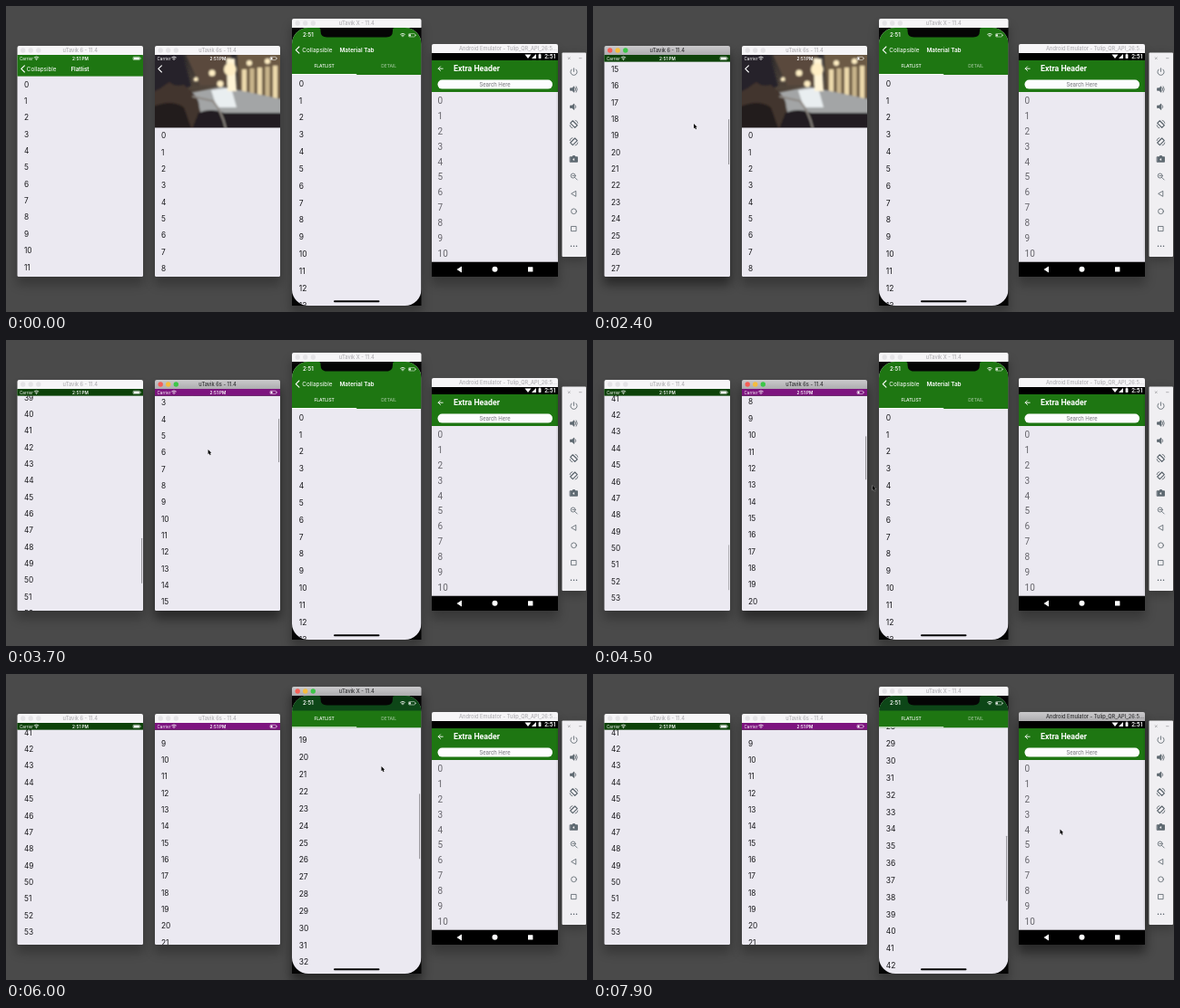
These frames come from a looping animation (640 by 338 pixels, 8 s). An HTML page:

```html
<!DOCTYPE html>
<html lang="en">
<head>
<meta charset="utf-8">
<title>Collapsible headers</title>
<style>
  html, body { margin: 0; width: 100%; height: 100%; overflow: hidden; background: #4a4a4a; }
  svg { display: block; width: 100%; height: 100%; }
  text { font-family: Inter, "Open Sans", sans-serif; white-space: pre; }
  .droid { font-family: Roboto, sans-serif; }
  .bar { fill: #f6f5f7; }
  .title { fill: #b0afb3; }
  .light { fill: #e4e3e6; }
  .shadow { fill: #000; opacity: .25; }
  .active .bar { fill: url(#chrome); }
  .active .title { fill: #303032; }
  .active .l0 { fill: #f65e56; }
  .active .l1 { fill: #f5bd3c; }
  .active .l2 { fill: #3cc648; }
  .active .shadow { opacity: .45; }
  .line { fill: none; stroke-linecap: round; stroke-linejoin: round; }
</style>
</head>
<body>
<svg id="stage" viewBox="0 0 640 338" preserveAspectRatio="none"></svg>
<script>
const LOOP = 8000;
const GREEN = '#1e7612', PAPER = '#ebe9f1', INK = '#17171a';

const rect = (x, y, w, h, fill, more = '') =>
  `<rect x="${x}" y="${y}" width="${w}" height="${h}" fill="${fill}" ${more}/>`;
const dot = (x, y, r, fill, more = '') =>
  `<circle cx="${x}" cy="${y}" r="${r}" fill="${fill}" ${more}/>`;
const path = (d, fill, more = '') => `<path d="${d}" fill="${fill}" ${more}/>`;
const line = (d, color, width, more = '') =>
  `<path class="line" d="${d}" stroke="${color}" stroke-width="${width}" ${more}/>`;
// y is the middle of the capitals
const label = (s, x, y, size, fill, more = '') =>
  `<text x="${x}" y="${y + size * .36}" font-size="${size}" fill="${fill}" ${more}>${s}</text>`;
const MID = 'text-anchor="middle"';
const BOLD = 'font-weight="600"';

const rows = (count, x, y, step, size, fill, more = '') =>
  Array.from({ length: count }, (_, i) => label(i, x, y + i * step, size, fill, more)).join('');

const chevron = (x, y) => line(`M${x + 3.6} ${y - 3.6}l-3.6 3.6 3.6 3.6`, '#fff', 1.1);
const wifi = (x, y) =>
  line(`M${x - 2.4} ${y - .8}q2.4 -2 4.8 0M${x - 1.3} ${y + .5}q1.3 -1.1 2.6 0`, '#fff', .8) + dot(x, y + 1.6, .6, '#fff');
const battery = (x, y, w, level) =>
  rect(x, y - 1.7, w, 3.4, 'none', 'rx=".8" stroke="#fff" stroke-width=".5"') +
  rect(x + .6, y - 1.1, (w - 1.2) * level, 2.2, '#fff', 'rx=".3"') + rect(x + w + .5, y - .6, .6, 1.2, '#fff');

const statusBar = (x, level) =>
  label('Carrier', x + 2.5, 57.9, 4.6, '#fff') + wifi(x + 21, 57.6) +
  label('2:51 PM', x + 69.5, 57.9, 4.7, '#fff', `${MID} ${BOLD}`) +
  battery(level < 1 ? x + 127 : x + 127.5, 57.9, level < 1 ? 6.5 : 7.5, level);

function frameOf({ id, x, y, w, h, title, lights = true, titleX = x + w / 2, anchor = 'middle' }, body) {
  const dots = lights ? [6.2, 14.7, 23.3].map((d, i) =>
    `<circle class="light l${i}" cx="${x + d}" cy="${y + 5}" r="2.7"/>`).join('') : '';
  return `<g id="${id}">
    <rect class="shadow" x="${x - 1}" y="${y + 8}" width="${w + 2}" height="${h + 1}" rx="4" filter="url(#soft)"/>
    ${body}
    <path class="bar" d="M${x} ${y + 10}v-8q0-2 2-2h${w - 4}q2 0 2 2v8z"/>${dots}
    <text class="title" x="${titleX}" y="${y + 7.2}" font-size="5.7" font-weight="500" text-anchor="${anchor}">${title}</text>
  </g>`;
}

const clip = (id, content) => `<g clip-path="url(#${id}Clip)">${content}</g>`;
const thumb = (id, x, len) => rect(x, 0, 1.1, len, '#98979c', `id="${id}Thumb" rx=".5"`);

const flat = frameOf({ id: 'flat', x: 12.5, y: 44, w: 138.5, h: 255, title: 'uTavik 6 - 11.4' }, clip('flat',
  rect(12, 53, 140, 247, PAPER) +
  `<g id="flatList">${rows(60, 20, 86.6, 18.36, 8.3, INK)}</g>` + thumb('flat', 149, 50) +
  `<g id="flatHead">${rect(12, 44, 140, 33.6, GREEN)}
    <g id="flatNav">${chevron(16.8, 69.4)}${label('Collapsible', 22.8, 69.6, 6.3, '#fff')}
    ${label('Flatlist', 81.5, 69.6, 6.3, '#fff', `${MID} ${BOLD}`)}</g></g>` +
  rect(12, 53, 140, 8.6, '#062d06', 'id="flatShade"') + statusBar(12.5, 1)));

const windows = Array.from({ length: 5 }, (_, i) =>
  rect(260 + i * 8.5, 70 - i, 5, 30 + i * 2, i % 2 ? '#c9b58c' : '#ecd9ab')).join('');
const photo = `<g clip-path="url(#photoClip)">
  ${rect(164, 44, 138, 92, 'url(#night)')}
  <g filter="url(#blur)">
    ${path('M198 54h50v34h-34z', '#5a4a3c')}
    ${path('M254 50h50v60l-46-12z', '#6c5a44')}
    ${windows}
    ${path('M202 96l36-7 66 14v22h-92z', '#a3a5a6')}
    ${path('M226 93l22-3 6 22h-22z', '#e9eef0')}
    ${path('M243 58h9l2 36h-10z', '#fff4d6')}
    ${[[247, 70, 7], [227, 74, 3.5], [209, 81, 2.5], [268, 63, 3], [236, 86, 3.5], [288, 61, 3]]
      .map(([x, y, r]) => dot(x, y, r, '#ffeec4')).join('')}
    ${path('M160 50h34l10 38-18 10h-26z', '#25242a')}
    ${path('M160 96q10-4 20-12l4 3q6 2 12 0l5 5q12 8 12 20l6 26h-60z', '#42352d')}
    ${path('M160 112q22-10 36 0l10 28h-46z', '#241d1c')}
    ${path('M212 118q14-6 28 0l64 0v20h-100z', '#201d20')}
    ${line('M206 100l22 5q10 12 14 30', '#8b8580', 2)}
  </g></g>`;

const image = frameOf({ id: 'image', x: 164, y: 44, w: 138, h: 255, title: 'uTavik 6s - 11.4' }, clip('image',
  rect(163, 53, 140, 247, PAPER) +
  `<g id="imageList">${rows(60, 171, 143.3, 18.36, 8.3, INK)}</g>` + thumb('image', 300, 48) +
  `<g id="imageHead">${photo}${rect(163, 44, 140, 90.2, '#7d147f', 'id="imageTint"')}
    <g id="imageNav">${chevron(167.8, 69.4)}</g></g>` + statusBar(164, .35)));

const tabs = frameOf({ id: 'tabs', x: 315, y: 14, w: 142.5, h: 317, title: 'uTavik X - 11.4' },
  rect(315, 23, 142.5, 308, '#050505') + clip('tabs',
  rect(315, 24, 142.5, 307, PAPER) +
  `<g id="tabsList">${rows(60, 322.7, 85.6, 18.85, 8.5, INK)}</g>` + thumb('tabs', 455, 72) +
  `<g id="tabsHead">${rect(315, 14, 142.5, 62, GREEN)}
    <g id="tabsNav">${chevron(319.3, 48.6)}${label('Collapsible', 326.3, 48.6, 6.4, '#fff')}
    ${label('Material Tab', 386.5, 48.6, 6.4, '#fff', `${MID} ${BOLD}`)}</g>
    ${label('FLATLIST', 350.6, 66, 4.9, '#fff', `${MID} font-weight="500"`)}
    ${label('DETAIL', 421.7, 66, 4.9, '#fff', `${MID} font-weight="500" opacity=".55"`)}
    ${rect(315, 75, 71.2, 1, '#fff')}</g>` +
  rect(315, 24, 142.5, 16.5, '#06331a', 'id="tabsShade"') +
  path('M344.5 24q2 0 2 2v1.5q0 7 7 7h65.5q7 0 7-7v-1.5q0-2 2-2z', '#050505') +
  label('2:51', 327, 32.3, 5.9, '#fff', BOLD) + wifi(437, 32) + battery(443.5, 32.3, 7, .3) +
  rect(361, 325.2, 50.5, 2, '#050505', 'rx="1"')));

const droid = frameOf({ id: 'droid', x: 469, y: 42, w: 139, h: 257, lights: false,
    title: 'Android Emulator - Tulip_QR_API_26:5...', titleX: 499, anchor: 'start' },
  rect(469, 51, 139, 248, '#000') + rect(469, 60, 139, 35, GREEN) + rect(469, 95, 139, 187.7, PAPER) +
  path('M571.5 53.5h7l-3.5 4.4z', '#fff') + path('M584 53v5h-5z', '#fff') +
  rect(586.6, 53.2, 2.8, 4.8, '#fff', 'rx=".4"') + rect(587.4, 52.6, 1.2, .8, '#fff') +
  label('2:51', 593.3, 55.8, 6.6, '#fff', 'class="droid" font-weight="500"') +
  line('M481.2 69.2h-5m2.300-2.300l-2.300 2.300 2.300 2.300', '#fff', .9) +
  label('Extra Header', 493, 69.3, 8.8, '#fff', 'class="droid" font-weight="700"') +
  rect(475.5, 81.6, 126.5, 10, '#fdfdfe', 'rx="5"') +
  label('Search Here', 538.5, 86.8, 6.3, '#7b7b80', `class="droid" ${MID}`) +
  rows(11, 475.6, 104.2, 16.93, 10, '#66656b', 'class="droid"') +
  path('M502 287.5v7l-5.5-3.5z', '#fff') + dot(538.5, 290.8, 3, '#fff') + rect(575, 288.2, 5.4, 5.4, '#fff', 'rx=".4"'));

// Each icon is drawn around 0,0
const speaker = '<path d="M-3.6 -1.2h1.7l2.200-2v6.400l-2.200-2h-1.700z" fill="#5f6b73"/>';
const turned = '<path d="M-3.8 -1.2l2.600-2.600 5 5-2.600 2.600z" stroke-width="1.100"/><path d="M1.600 -4.200q2.600 .4 2.800 3M-1.600 4.200q-2.600-.4-2.800-3"/>';
const icons = [
  '<path d="M0 -4v3.600M-2.300 -2.800a3.600 3.600 0 1 0 4.600 0"/>',
  speaker + '<path d="M1.600 -1.800q1.500 1.800 0 3.600M2.700 -3.200q2.400 3.200 0 6.400"/>',
  speaker + '<path d="M1.700 -1.500q1.300 1.500 0 3"/>',
  turned,
  `<g transform="scale(-1 1)">${turned}</g>`,
  '<path d="M-4 -2.300h2l1-1.200h2l1 1.200h2v5.500h-8z" fill="#5f6b73"/><circle r="1.500" cy=".4" fill="#efeff1"/>',
  '<circle cx="-.8" cy="-.8" r="2.500"/><path d="M1.200 1.200l2.500 2.500M-1.600 -.8h1.600"/>',
  '<path d="M2.300 -2.800v5.600l-4.800-2.800z"/>',
  '<circle r="2.900"/>',
  '<path d="M-2.600 -2.600h5.200v5.200h-5.200z"/>',
  '<path d="M-3 0h.1M0 0h.1M3 0h.1" stroke-width="1.400"/>'
];
const toolbar = rect(612, 55, 28, 225, '#000', 'opacity=".3" filter="url(#soft)"') +
  rect(612.5, 51.5, 26.5, 225.5, '#f0eff2', 'rx="1"') +
  line('M619.3 56.7l2 2m0-2l-2 2M631.5 57.7h2.5', '#8a8a8e', .6) +
  icons.map((d, i) => `<g class="line" stroke="#566068" stroke-width=".8" transform="translate(625.5 ${72.8 + i * 19.25})">${d}</g>`).join('');

const defs = `<defs>
  <linearGradient id="chrome" x2="0" y2="1"><stop stop-color="#cbcacc"/><stop offset="1" stop-color="#adacaf"/></linearGradient>
  <linearGradient id="night" x2="0" y2="1"><stop stop-color="#26252a"/><stop offset=".5" stop-color="#4f443a"/><stop offset="1" stop-color="#1a171a"/></linearGradient>
  <filter id="soft" x="-20%" y="-20%" width="140%" height="140%"><feGaussianBlur stdDeviation="6"/></filter>
  <filter id="blur"><feGaussianBlur stdDeviation="1"/></filter>
  <clipPath id="flatClip"><rect x="12.5" y="53.5" width="138.5" height="245.5" rx="1.5"/></clipPath>
  <clipPath id="imageClip"><rect x="164" y="53.5" width="138" height="245.5" rx="1.5"/></clipPath>
  <clipPath id="photoClip"><rect x="164" y="44" width="138" height="90.2"/></clipPath>
  <clipPath id="tabsClip"><rect x="315" y="24" width="142.5" height="307" rx="18"/></clipPath>
</defs>`;

const pointer = `<g id="pointer">
  <circle id="ring" cx=".3" cy="1" r="9.3" fill="none" stroke="#1b1b1d" stroke-width="1"/>
  <path transform="scale(.8)" d="M0 0v6.600l1.500-1.400 1.100 2.500 1.200-.5-1.100-2.500h2z" fill="#000" stroke="#fff" stroke-width=".6" paint-order="stroke"/></g>`;

document.getElementById('stage').innerHTML =
  defs + rect(0, 0, 640, 338, '#4a4a4a') + flat + image + tabs + droid + toolbar + pointer;

const $ = id => document.getElementById(id);
const clamp = v => Math.max(0, Math.min(1, v));

// Smooth curve through [time, value] points that never overshoots
function curve(points, t) {
  const last = points.length - 1;
  if (t <= points[0][0]) return points[0][1];
  if (t >= points[last][0]) return points[last][1];
  const slope = i => (points[i + 1][1] - points[i][1]) / (points[i + 1][0] - points[i][0]);
  const tangent = i => {
    if (i === 0 || i === last) return 0;
    const a = slope(i - 1), b = slope(i);
    return a * b > 0 ? 2 * a * b / (a + b) : 0;
  };
  const i = points.findIndex(p => p[0] > t) - 1;
  const [t0, v0] = points[i], [t1, v1] = points[i + 1];
  const d = t1 - t0, u = (t - t0) / d, w = 1 - u;
  return v0 * (1 + 2 * u) * w * w + tangent(i) * d * u * w * w +
    v1 * u * u * (3 - 2 * u) - tangent(i + 1) * d * u * u * w;
}

const lists = [
  { id: 'flat', collapse: 16.2, thumb: [63.6, .21], focus: [1000, 3250], fade: 4400,
    scroll: [[1150, 0], [1500, 75], [1800, 200], [2400, 292], [2750, 296], [2950, 400], [3250, 600], [3700, 739], [4400, 774.6]] },
  { id: 'image', collapse: 72.6, thumb: [59.8, .21], focus: [3250, 4700], fade: 5350,
    scroll: [[3280, 0], [3500, 70], [3700, 129], [4200, 205], [4900, 232]] },
  { id: 'tabs', collapse: 16.7, thumb: [39.3, .251], focus: [4700, 7550], fade: LOOP,
    scroll: [[4720, 0], [4950, 95], [5300, 213.9], [5620, 236], [5850, 330], [6200, 410], [6800, 480.8], [7300, 525], [7900, 555.2]] }
];
const presses = [[1000, 1500], [2700, 2950], [3250, 3500], [4700, 4950], [5600, 5850], [7550, 7650]];
const route = [[800, 128, 232], [1000, 99.2, 207.6], [1150, 99.2, 207.6], [1500, 111, 130], [2400, 111, 130],
  [2700, 106, 212], [2950, 111, 132], [3250, 226, 212], [3500, 222.6, 121], [4300, 222.6, 121], [4700, 392, 200],
  [4950, 389, 96.5], [5300, 389, 96.5], [5600, 402, 204], [5850, 413.5, 102], [6900, 413.5, 102], [7500, 514.5, 171.5]];
const routeX = route.map(p => [p[0], p[1]]), routeY = route.map(p => [p[0], p[2]]);
const within = ([a, b], t) => t >= a && t < b;
const pressedRow = $('flatList').children[7];

function draw(t) {
  for (const { id, collapse, thumb, focus, fade, scroll } of lists) {
    const s = curve(scroll, t), shift = Math.min(s, collapse), folded = shift / collapse;
    $(id).classList.toggle('active', within(focus, t));
    $(id + 'List').setAttribute('transform', `translate(0 ${-s})`);
    $(id + 'Head').setAttribute('transform', `translate(0 ${-shift})`);
    $(id + 'Nav').setAttribute('opacity', 1 - folded);
    $(id + 'Thumb').setAttribute('y', thumb[0] + thumb[1] * s);
    $(id + 'Thumb').setAttribute('opacity', s > 0 ? clamp(1 - (t - fade) / 300) : 0);
    const tint = $(id + 'Shade');
    if (tint) tint.setAttribute('opacity', .7 * folded);
    else $(id + 'Tint').setAttribute('opacity', folded);
  }
  $('droid').classList.toggle('active', t >= 7550);
  pressedRow.setAttribute('opacity', within([1000, 1200], t) ? 0 : 1);
  $('pointer').setAttribute('transform', `translate(${curve(routeX, t)} ${curve(routeY, t)})`);
  $('pointer').setAttribute('visibility', t >= 800 ? 'visible' : 'hidden');
  $('ring').setAttribute('opacity', presses.some(p => within(p, t)) ? 1 : 0);
}

const start = performance.now();
function tick() {
  draw((performance.now() - start) % LOOP);
  requestAnimationFrame(tick);
}
tick();
</script>
</body>
</html>
```
